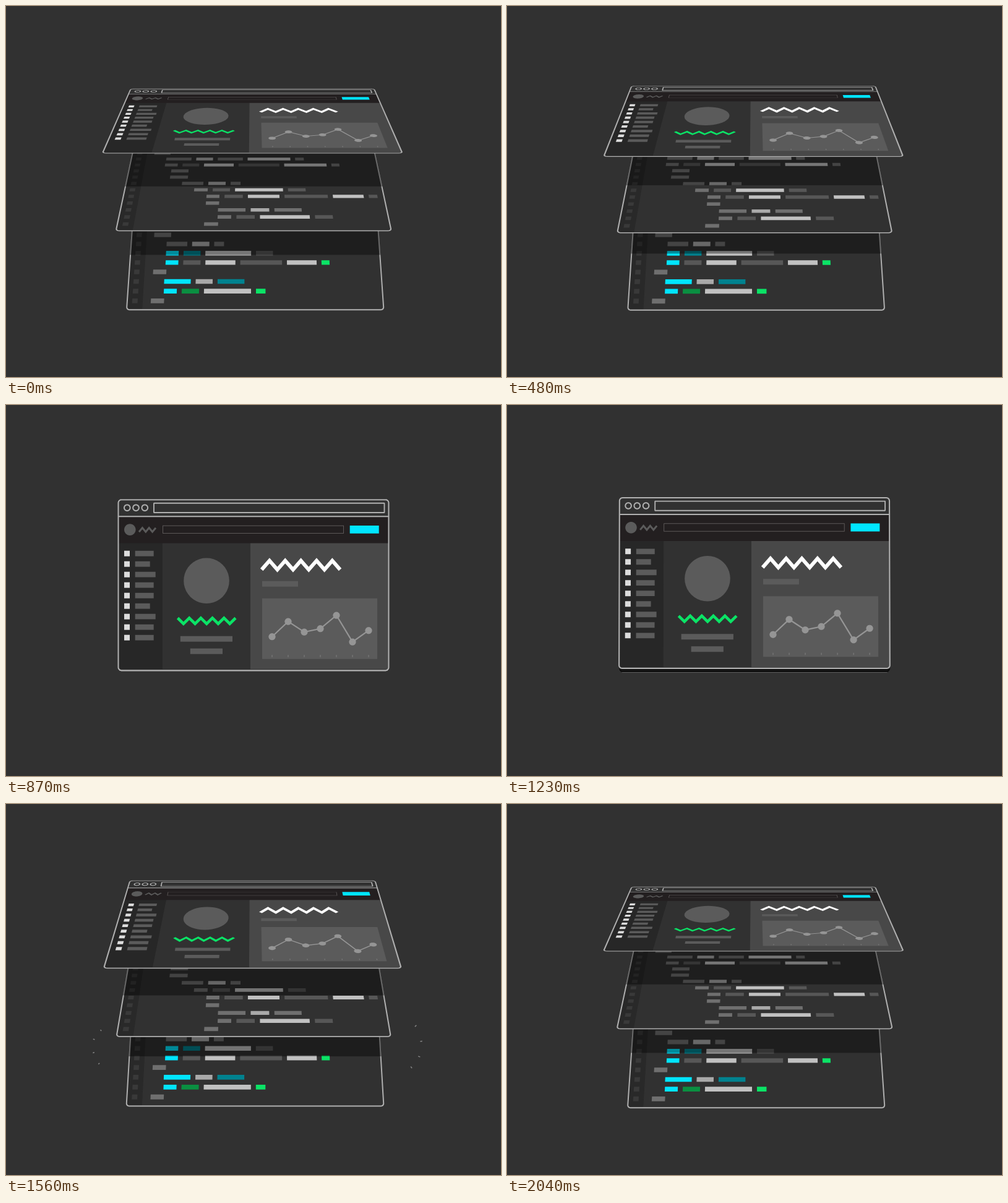
An HTML page with a canvas that plays this animation: 800 by 600 pixels, repeating every 2.07 s.

```html
<!DOCTYPE html>
<html lang="en">
<head>
<meta charset="utf-8">
<title>Layered interface</title>
<style>
  html, body { margin: 0; width: 100%; height: 100%; overflow: hidden; background: #313131; }
  canvas { display: block; width: 800px; height: 600px; }
</style>
</head>
<body>
<canvas id="stage" width="800" height="600"></canvas>
<script>
const ctx = document.getElementById('stage').getContext('2d');
const LOOP = 2070, DEPTH = 1220, CX = 400, CY = 288, REST_Y = 291.2;
const BASE = '#313131', LINE = '#b0b0b0', GREY = '#5b5b5b', CYAN = '#00e5ff', GREEN = '#0be366';

// Bar colours of the code rows
const INK = {
  m: '#6f6f6f', d: '#575757', l: '#a9a9a9', w: '#c1c1c1',
  c: CYAN, t: '#00828f', g: GREEN, G: '#0a8f41'
};

// Rows from the bottom up: start x, then colour and width of each bar
const MIDDLE_ROWS = [
  '320.5 m22.5', '341.6 m22 d29.7 w80.8 d29', '341.5 m45.2 l30.4 m44.7', '320.8 m22',
  '320.9 m21.8 d30.7 w52.9 d72.6 w51.6 d14.6', '299.2 m23 d29.3 w81.3 d29.9',
  '277.3 m36.6 l29.7 m17', '255.3 m31', '255.8 m30.3',
  '243.3 m22.5 d29.5 w52.5 d72.2 w75 m14.2',
  '244 m45 l30 m44.8 w76.3 m15.5', '221.2 m29'
];
const BOTTOM_ROWS = [
  '221.8 m22.6', '243.2 c22.2 G29.7 w80.8 g16.4', '242.9 c45.9 l29.3 t46.4', '222.9 m23',
  '243.8 c22.2 d30.2 w52.3 d72.9 w51.8 g14', '243.7 c22.2 t29.8 w80.2 d29.8',
  '243.9 m36.5 l30.4 m17.3', '221.2 m30'
];
const MENU = [30, 24, 33, 30, 30];

const clamp = v => Math.min(1, Math.max(0, v));

function bezier(x1, x2) {
  return t => {
    t = clamp(t);
    let lo = 0, hi = 1;
    for (let i = 0; i < 24; i++) {
      const s = (lo + hi) / 2, n = 1 - s;
      if (3 * n * n * s * x1 + 3 * n * s * s * x2 + s * s * s < t) lo = s; else hi = s;
    }
    return lo * lo * (3 - 2 * lo);
  };
}
const liftIn = bezier(0.2, 0.175), liftOut = bezier(0.81, 0.705);
const tiltIn = bezier(0.3, 0.315), tiltOut = bezier(0.7, 0.65);

function lift(t) {
  return t < 1000 ? 1 - liftOut((t - 540) / 330) : liftIn((t - 1200) / 540);
}

function tilt(t) {
  if (t < 540) return 1 - 0.042 * (t / 540) ** 2;
  if (t < 1000) return 0.958 * (1 - tiltOut((t - 540) / 330));
  if (t < 1740) return 0.9685 * tiltIn((t - 1200) / 540);
  return 1 - 0.0315 * (1 - clamp((t - 1740) / 300)) ** 2;
}

let project;

function setPlane(dx, cy, far, degrees) {
  const a = degrees * Math.PI / 180, sin = Math.sin(a) / DEPTH, cos = Math.cos(a);
  project = (x, y) => {
    const w = 1 + far - (y - CY) * sin;
    return [CX + dx + (x - CX) / w, cy + (y - CY) * cos / w];
  };
}

function trace(...loops) {
  ctx.beginPath();
  for (const pts of loops) {
    ctx.moveTo(...project(...pts[0]));
    for (const p of pts.slice(1)) ctx.lineTo(...project(...p));
    ctx.closePath();
  }
}

function fill(color, ...loops) {
  trace(...loops);
  ctx.fillStyle = color;
  ctx.fill('evenodd');
}

const rect = (x, y, r, b) => [[x, y], [r, y], [r, b], [x, b]];

function circle(x, y, r) {
  return Array.from({ length: 40 }, (_, i) => {
    const a = i * Math.PI / 20;
    return [x + r * Math.cos(a), y + r * Math.sin(a)];
  });
}

function rounded(x, y, r, b, rad) {
  const corners = [[r - rad, b - rad], [x + rad, b - rad], [x + rad, y + rad], [r - rad, y + rad]];
  return corners.flatMap(([cx, cy], i) => Array.from({ length: 7 }, (_, j) => {
    const a = (i + j / 6) * Math.PI / 2;
    return [cx + rad * Math.cos(a), cy + rad * Math.sin(a)];
  }));
}

function frame(color, x, y, r, b, rad, width) {
  const h = width / 2;
  fill(color, rounded(x - h, y - h, r + h, b + h, rad + h),
    rounded(x + h, y + h, r - h, b - h, Math.max(0, rad - h)));
}

// Mitred stroke as a polygon, so that its weight follows the tilt
function stroke(color, pts, width) {
  const h = width / 2, left = [], right = [];
  const normal = (a, b) => {
    const dx = b[0] - a[0], dy = b[1] - a[1], len = Math.hypot(dx, dy);
    return [-dy / len, dx / len];
  };
  pts.forEach((p, i) => {
    const n1 = normal(pts[Math.max(0, i - 1)], pts[Math.max(1, i)]);
    const n2 = i < pts.length - 1 ? normal(p, pts[i + 1]) : n1;
    const k = h / (1 + n1[0] * n2[0] + n1[1] * n2[1]);
    const ox = (n1[0] + n2[0]) * k, oy = (n1[1] + n2[1]) * k;
    left.push([p[0] + ox, p[1] + oy]);
    right.unshift([p[0] - ox, p[1] - oy]);
  });
  fill(color, left.concat(right));
}

function zigzag(color, x, step, count, first, second, width) {
  const pts = Array.from({ length: count }, (_, i) => [x + i * step, i % 2 ? second : first]);
  stroke(color, pts, width);
}

const panelShape = grow => rounded(181.5 - grow, 150 - grow, 618.5 + grow, 426 + grow, 5 + grow);
const outline = () => frame(LINE, 181.5, 150, 618.5, 426, 5, 2.1);

function codePanel(rows) {
  fill(BASE, panelShape(0));
  fill('#292929', rect(182, 155, 208, 425));
  for (let i = 0; i < 14; i++) {
    const y = 410 - 17.5 * i;
    fill('#393939', rect(190, y - 4.3, 199.3, y + 4.3));
    if (!rows[i]) continue;
    const [start, ...bars] = rows[i].split(' ');
    let x = +start;
    for (const bar of bars) {
      const w = +bar.slice(1);
      fill(INK[bar[0]], rect(x, y - 4.3, x + w, y + 4.3));
      x += w + 8.5;
    }
  }
  outline();
}

function shade(edge, alpha) {
  ctx.save();
  trace(panelShape(1.2));
  ctx.clip();
  ctx.fillStyle = `rgba(0,0,0,${alpha})`;
  ctx.fillRect(0, 0, 800, edge);
  ctx.restore();
}

function pagePanel() {
  fill(BASE, panelShape(0));
  fill('#272727', rect(182, 215, 253, 424));
  fill('#484848', rect(395, 215, 618, 424));
  fill('#231f20', rect(182, 177, 618, 220.3));

  // Title bar
  for (const x of [195.8, 210, 224.3]) fill(LINE, circle(x, 163, 5.8), circle(x, 163, 3.8));
  frame(LINE, 239, 155.6, 611.5, 170.8, 0.5, 1.9);
  fill(LINE, rect(182, 176.1, 618, 178));

  // Header
  fill(GREY, circle(200.3, 198.4, 9.3));
  zigzag(GREY, 215, 5.4, 6, 202, 195.5, 3);
  frame('#5c5858', 253.5, 192, 545.5, 204.3, 0, 1);
  fill(CYAN, rect(555.7, 191.7, 602.7, 204.6));

  // Menu
  for (let i = 0; i < 9; i++) {
    const y = 237 + 17 * i, w = MENU[i > 4 ? i - 4 : i];
    fill('#dcdcdc', rect(191, y - 4.5, 200, y + 4.5));
    fill(GREY, rect(208.7, y - 4.4, 208.7 + w, y + 4.4));
  }

  // Profile
  fill(GREY, circle(324, 281, 36.8));
  zigzag(GREEN, 277.5, 9.35, 11, 341.3, 350.5, 4.6);
  fill(GREY, rect(281.8, 370.5, 366, 379.5));
  fill(GREY, rect(297.8, 390.5, 350, 399.5));

  // Chart column
  zigzag('#ffffff', 413.2, 12.68, 11, 263, 248.5, 6);
  fill(GREY, rect(414, 281.5, 472, 290.5));
  fill(GREY, rect(414, 309.5, 600, 407.5));
  const dots = [371.5, 347, 364, 358.5, 337, 380, 361.5].map((y, i) => [430 + 26 * i, y]);
  stroke('#959595', dots, 2.2);
  for (const [x, y] of dots) {
    fill('#959595', circle(x, y, 5.6));
    fill('#777777', rect(x - 0.7, 401, x + 0.7, 404.5));
  }
  outline();
}

// Short rays beside the middle panel: start point and direction
const RAYS = [
  [168, 382, -5.5, -6], [166, 388.5, -9, -3], [165.5, 395.5, -9, 2.5], [167.5, 404, -6.5, 6],
  [639.5, 381.5, 8.5, -8.5], [640.5, 389, 11.5, -2], [638.5, 396.5, 11, 4.5], [636.5, 402, 7, 9]
];

function rays(t) {
  const head = 2.8 * clamp((t - 1350) / 168), tail = 2.8 * clamp((t - 1410) / 168);
  if (head <= tail) return;
  ctx.strokeStyle = '#868686';
  ctx.lineWidth = 1.5;
  ctx.beginPath();
  for (const [x, y, dx, dy] of RAYS) {
    ctx.moveTo(x + dx * tail, y + dy * tail);
    ctx.lineTo(x + dx * head, y + dy * head);
  }
  ctx.stroke();
}

function draw(t) {
  const q = lift(t), r = tilt(t);
  const alpha = 0.39 + 0.55 * (1 - q) ** 1.3;
  const reach = 1 - (1 - q) ** 4, extra = Math.max(0, r - 0.955);

  const topPlane = () => setPlane(-1.7 * q, REST_Y - 110.6 * q, 0.0065 * q, 68 * r);
  const midPlane = () => setPlane(0.2 * q, REST_Y - 14.2 * q * (1.25 - 0.25 * q), 0.0711 * q, 52 * r);
  const lowPlane = () => setPlane(2.7 * q, REST_Y + 79.3 * q, 0.0958 * q, 23 * r);
  const bottomEdge = plane => { plane(); return project(CX, 426)[1]; };
  const topEdge = bottomEdge(topPlane), midEdge = bottomEdge(midPlane);

  ctx.fillStyle = BASE;
  ctx.fillRect(0, 0, 800, 600);

  lowPlane();
  codePanel(BOTTOM_ROWS);
  shade(midEdge + 32 * reach + 155 * extra, alpha);

  midPlane();
  codePanel(MIDDLE_ROWS);
  shade(topEdge + 44 * reach + 219 * extra, alpha);

  topPlane();
  pagePanel();
  rays(t);
}

const start = performance.now();
function tick() {
  draw((performance.now() - start) % LOOP);
  requestAnimationFrame(tick);
}
tick();
</script>
</body>
</html>
```
